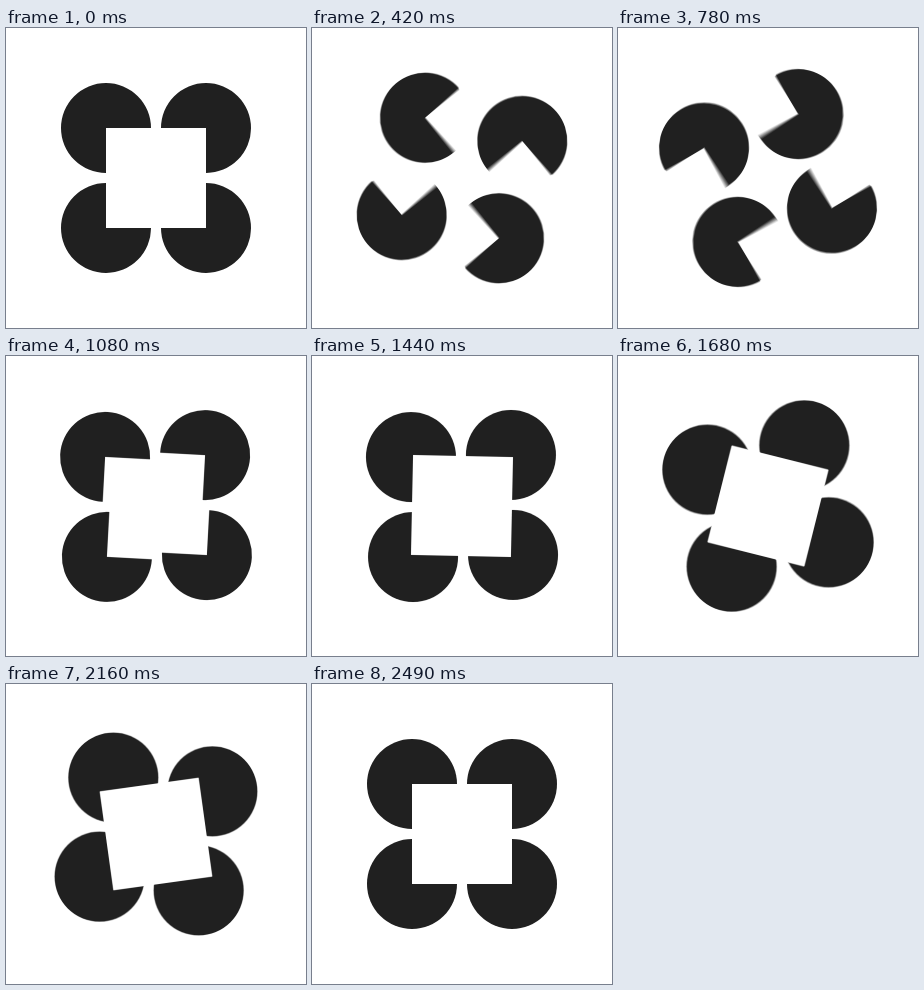
Recreate the animation shown at these times as an HTML page with a canvas. Size 300 px wide and 300 px high, loop 2520 ms.

```html
<!DOCTYPE html>
<html lang="en">
<head>
<meta charset="utf-8">
<title>Illusory square</title>
<style>
  html, body { margin: 0; width: 100%; height: 100%; overflow: hidden; background: #fff; }
  canvas { display: block; width: 300px; height: 300px; }
</style>
</head>
<body>
<canvas id="stage"></canvas>
<script>
const SIZE = 300, LOOP = 2520, HALF = LOOP / 2, STEP = 30;
const SHUTTER = 15, SAMPLES = 8, LAG = 6;
const RADIUS = 45, SIDE = 100, ORBIT = SIDE / Math.SQRT2;
const QUARTER = Math.PI / 2;
const INK = '#202020', PAPER = '#fff';

const scale = window.devicePixelRatio || 1;
const stage = document.getElementById('stage');
const layer = document.createElement('canvas');
for (const c of [stage, layer]) c.width = c.height = Math.round(SIZE * scale);
const out = stage.getContext('2d');
const ctx = layer.getContext('2d');

function ease(p) {
  p = Math.min(1, Math.max(0, p));
  return p < 0.5 ? 4 * p ** 3 : 1 - 4 * (1 - p) ** 3;
}

// Four discs on a ring; each may have a quarter cut out, centred on angle cut(i).
function discs(turn, cut) {
  ctx.fillStyle = INK;
  for (let i = 0; i < 4; i++) {
    const a = (i + 0.5) * QUARTER + turn;
    const x = ORBIT * Math.cos(a), y = ORBIT * Math.sin(a);
    ctx.beginPath();
    if (cut) {
      const mid = cut(i);
      ctx.moveTo(x, y);
      ctx.arc(x, y, RADIUS, mid + QUARTER / 2, mid - QUARTER / 2 + 4 * QUARTER);
      ctx.closePath();
    } else {
      ctx.arc(x, y, RADIUS, 0, 4 * QUARTER);
    }
    ctx.fill();
  }
}

function drawScene(t) {
  ctx.setTransform(scale, 0, 0, scale, 0, 0);
  ctx.fillStyle = PAPER;
  ctx.fillRect(0, 0, SIZE, SIZE);
  ctx.translate(SIZE / 2, SIZE / 2);
  if (t < HALF) {
    // The ring turns clockwise while the notched discs spin backwards.
    const turn = QUARTER * ease((t - LAG) / HALF);
    discs(turn, i => (i + 2.5) * QUARTER - 3 * turn);
  } else {
    // Whole discs turn one way, the white square the other.
    const turn = QUARTER * ease((t - HALF) / HALF);
    discs(-turn);
    ctx.rotate(turn);
    ctx.fillStyle = PAPER;
    ctx.fillRect(-SIDE / 2, -SIDE / 2, SIDE, SIDE);
  }
}

// Average several moments of the open shutter for motion blur.
function render(t) {
  for (let k = 0; k < SAMPLES; k++) {
    drawScene(t + SHUTTER * (k + 0.5) / SAMPLES);
    out.globalAlpha = 1 / (k + 1);
    out.drawImage(layer, 0, 0);
  }
}

let shown = -1;
function tick(now) {
  const step = Math.floor(((now + 1) % LOOP) / STEP);
  if (step !== shown) {
    shown = step;
    render(step * STEP);
  }
  requestAnimationFrame(tick);
}
tick(performance.now());
</script>
</body>
</html>
```
